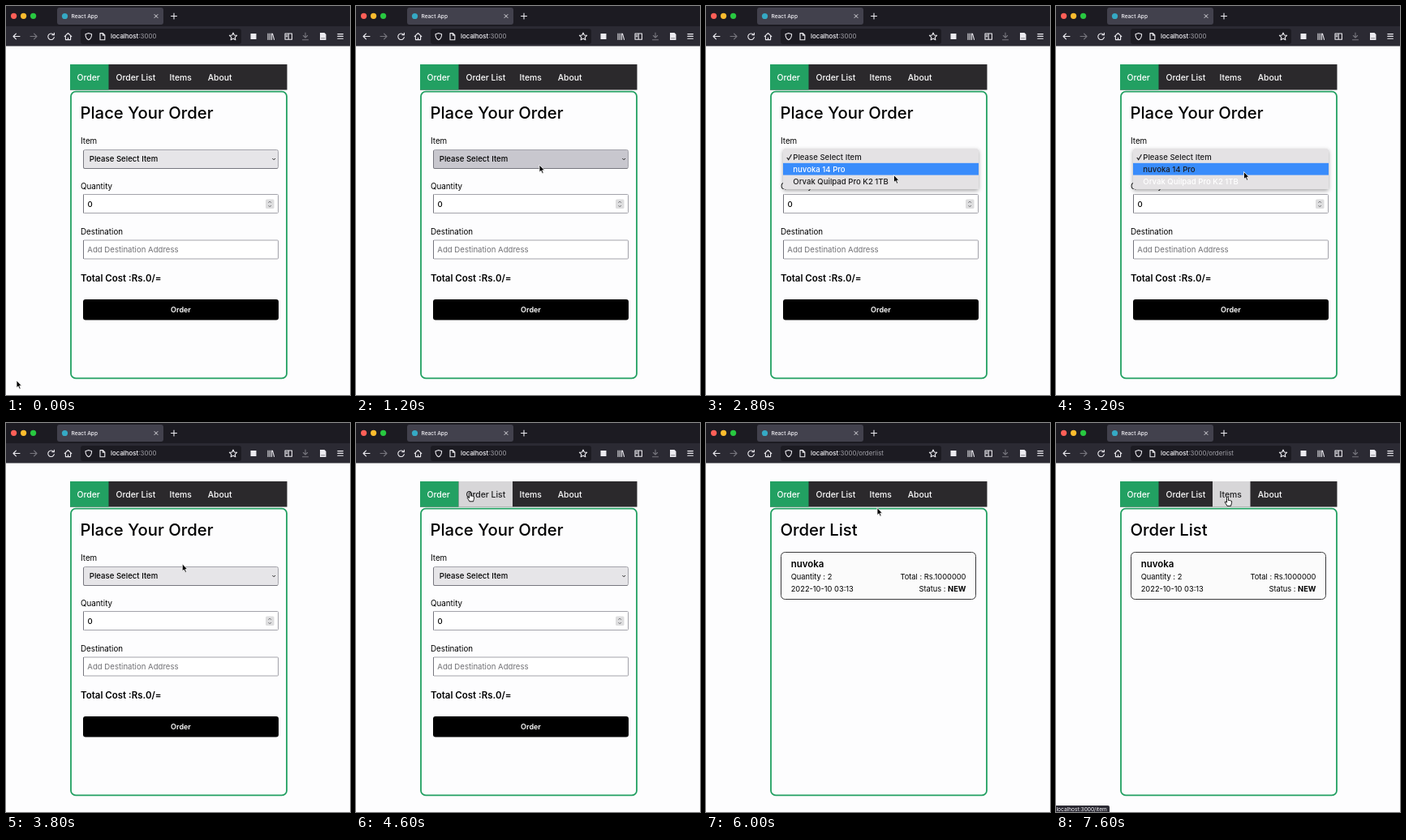
Recreate the animation shown at these times as an HTML page. Size 424 by 480 pixels, loop 8000 ms.

```html
<!DOCTYPE html>
<html lang="en">
<head>
<meta charset="utf-8">
<title>Order form</title>
<style>
html, body { margin: 0; width: 100%; height: 100%; overflow: hidden; background: #fdfdfe; }
svg { display: block; width: 424px; height: 480px; font-family: Inter, "Open Sans", sans-serif; font-size: 9.8px; }
text { white-space: pre; }
.icon { fill: none; stroke: #ecebf0; stroke-width: 1.1; stroke-linecap: round; stroke-linejoin: round; }
.dim { stroke: #77767e; }
.nav { font-size: 10.4px; font-weight: 500; }
.title { font-size: 20.3px; font-weight: 500; }
.strong { font-size: 11.5px; font-weight: 600; }
.field { fill: #fff; stroke: #a3a3aa; }
.edge { fill: none; stroke: #77777f; }
.option { font-size: 9.6px; font-weight: 500; }
.card { font-size: 9.3px; }
</style>
</head>
<body>
<svg viewBox="0 0 424 480">
  <defs>
    <filter id="shadow" x="-10%" y="-20%" width="120%" height="150%">
      <feDropShadow dx="0" dy="2" stdDeviation="2.5" flood-opacity=".35"/>
    </filter>
  </defs>
  <rect width="424" height="480" fill="#fdfdfe"/>

  <!-- Browser chrome -->
  <rect width="424" height="26" fill="#1c1b22"/>
  <rect y="25" width="424" height="24.5" fill="#2b2a33"/>
  <circle cx="9.6" cy="12.3" r="3.6" fill="#fe5f57"/>
  <circle cx="21.6" cy="12.3" r="3.6" fill="#febc2e"/>
  <circle cx="33.6" cy="12.3" r="3.6" fill="#28c840"/>
  <rect x="63" y="2" width="131" height="21" rx="3" fill="#42414d"/>
  <circle cx="72.5" cy="12.5" r="3.6" fill="#35a9c4"/>
  <text x="80.5" y="15" font-size="6.6" font-weight="500" fill="#f4f3f8">React App</text>
  <rect x="92" y="28" width="198" height="19" rx="3" fill="#1c1b22"/>
  <g class="icon">
    <path d="M183 10.5l4 4m0-4l-4 4" stroke-width=".9"/>
    <path d="M203.5 12.5h7m-3.5-3.5v7"/>
    <path d="M17 37.5H9m3.4-3.4L9 37.5l3.4 3.4"/>
    <path class="dim" d="M30 37.5h8m-3.4-3.4l3.4 3.4-3.4 3.4"/>
    <path d="M58.6 35.4a3.8 3.8 0 1 0 .7 3.2M59.4 33.2v2.6h-2.6"/>
    <path d="M72.2 37.6l4.3-4.1 4.3 4.1M73.4 37v4.6h6.2V37M76.5 41.4v-2"/>
    <path d="M101.8 33.4l3.8 1.3c0 3.7-1 5.8-3.8 7.1-2.8-1.3-3.8-3.4-3.8-7.1z"/>
    <path d="M116 33.6h3.4l2.4 2.4v5.7H116zM119.3 33.7v2.5h2.4"/>
    <path d="M280 33l1.4 3 3.2.4-2.4 2.2.7 3.2-2.9-1.6-2.9 1.6.7-3.2-2.4-2.2 3.2-.4z"/>
    <path d="M323 34v7.5m2.3-7.5v7.5m2.2-7.5v7.5m1-7.3l2 7.2"/>
    <path d="M344 34h8.4v7.2H344zm4.2 0v7.2m-2.9-5.2h1.5m-1.5 1.8h1.5"/>
    <path class="dim" d="M369 33v6m-2.6-2.5l2.6 2.6 2.6-2.6M365.5 41.8h7"/>
    <path d="M408.8 34.6h6.6m-6.6 2.8h6.6m-6.6 2.8h6.6"/>
  </g>
  <rect x="301.5" y="34" width="7" height="7" fill="#ecebf0"/>
  <path d="M387 33h5.5l2 2v7H387z" fill="#ecebf0"/>
  <path d="M388.2 39.8h5" stroke="#88878d"/>
  <text x="129" y="40.3" font-size="7.9" font-weight="500" fill="#f6f5fa">localhost<tspan id="path" font-weight="400" fill="#a3a2aa"></tspan></text>

  <!-- Navigation -->
  <rect x="79" y="72" width="267.5" height="31.5" fill="#2b292c"/>
  <rect x="79" y="72" width="47.5" height="31.5" fill="#22a062"/>
  <rect id="hover" y="72" height="31.5" fill="#d7d6d8"/>
  <g class="nav" fill="#fff">
    <text x="87.5" y="91.5">Order</text>
    <text id="listLink" x="135.5" y="91.5">Order List</text>
    <text id="itemsLink" x="201.5" y="91.5">Items</text>
    <text x="248.7" y="91.5">About</text>
  </g>
  <rect x="80" y="105.6" width="266" height="353.8" rx="6" fill="#fdfdfe" stroke="#22a062" stroke-width="1.8"/>

  <g id="formPage">
    <text class="title" x="91.5" y="139.3">Place Your Order</text>
    <text x="92" y="169.8">Item</text>
    <text x="92" y="225.5">Quantity</text>
    <text x="92" y="281.6">Destination</text>
    <rect id="select" class="field" x="95.5" y="177.5" width="240" height="23" rx="2"/>
    <path class="edge" d="M95.5 178.5v21q0 1 1 1h238"/>
    <text class="option" x="102.8" y="192.3">Please Select Item</text>
    <path d="M328.4 188l1.8 1.8 1.8-1.8" fill="none" stroke="#222"/>
    <rect class="field" x="95.5" y="232.5" width="240" height="23" rx="1"/>
    <path class="edge" d="M95.5 255.5v-23"/>
    <text class="option" x="100.5" y="248.3">0</text>
    <rect x="320" y="238.5" width="10.5" height="11.5" rx="1.5" fill="#dededf"/>
    <path d="M323.4 242.8l1.8-1.8 1.8 1.8m-3.6 3.2l1.8 1.8 1.8-1.8" fill="none" stroke="#66666b" stroke-width=".9"/>
    <rect class="field" x="95.5" y="289" width="240" height="23" rx="1"/>
    <path class="edge" d="M95.5 312v-23"/>
    <text x="100.3" y="304.3" font-size="9.6" fill="#707074">Add Destination Address</text>
    <text class="strong" x="92" y="339.6">Total Cost :Rs.0/=</text>
    <rect x="95" y="362" width="241" height="25.5" rx="3"/>
    <text x="215.5" y="377.6" font-size="9" font-weight="600" fill="#fff" text-anchor="middle">Order</text>
    <g id="menu">
      <rect x="95" y="176" width="241" height="50" rx="2.5" fill="#e4e2e4" filter="url(#shadow)"/>
      <rect id="highlight" x="95" width="241" height="14.8" fill="#398cfb"/>
      <path id="check" d="M99.8 187l1.9 2.7 3.7-6.4" fill="none" stroke-width="1.2"/>
      <g class="option" id="options">
        <text x="107.3" y="190">Please Select Item</text>
        <text x="107.3" y="204.8">nuvoka 14 Pro</text>
        <text x="107.3" y="219.6">Orvak Quilpad Pro K2 1TB</text>
      </g>
    </g>
  </g>

  <g id="listPage">
    <text class="title" x="91.5" y="139.3">Order List</text>
    <rect x="92.5" y="159.5" width="240" height="58" rx="5" fill="#fbfbfb" stroke="#3a3a3c"/>
    <text class="strong" x="104.7" y="178">nuvoka</text>
    <g class="card">
      <text x="104.7" y="193.2">Quantity : 2</text>
      <text x="104.7" y="207.6">2022-10-10 03:13</text>
      <g text-anchor="end">
        <text x="320.5" y="193.2">Total : Rs.1000000</text>
        <text x="320.5" y="207.6">Status : <tspan font-weight="700">NEW</tspan></text>
      </g>
    </g>
  </g>

  <g id="status">
    <path d="M0 472h64q2 0 2 2v6H0z" fill="#2b2a33"/>
    <text x="0.5" y="479" font-size="6.6" fill="#f6f5fa">localhost:3000/item</text>
  </g>

  <g id="pointer" stroke-linejoin="round">
    <path id="arrow" d="M0 0v9.2l2.1-1.9 1.5 3.4 1.6-.7-1.5-3.3h2.7z" fill="#000" stroke="#fff" stroke-width=".8"/>
    <path id="hand" d="M-1 1q0-1.3 1-1.3T1 1v3.2q.5-.7 1.4 0 .8-.5 1.4.3 1.3-.2 1.3 1.1c0 2.8-.8 3.1-1 5.2H-.6C-1 9.2-2.6 8-3.2 6.6q-.4-1.2.8-1.1L-1 6.6z" fill="#fff" stroke="#000" stroke-width=".9"/>
  </g>
</svg>
<script>
const LOOP = 8000, STEP = 200;
const MENU_OPEN = 1600, MENU_CLOSE = 3600, PAGE_CHANGE = 5000, STATUS_SHOW = 6800;
const el = id => document.getElementById(id);

// Pointer tip: time, x, y
const path = [
  [0, 13, 462], [1000, 226, 196], [1200, 226, 196], [1600, 231.5, 191], [2200, 231.5, 191],
  [2600, 231.5, 202], [3000, 231.5, 215], [3200, 231.5, 204.5], [3400, 231.5, 190],
  [3600, 231.5, 190], [4400, 140.5, 86], [5200, 140.5, 86], [5800, 211, 104.5],
  [6000, 211, 104.5], [6400, 211.5, 91.5], [LOOP, 211.5, 91.5]
];
const links = [
  { id: "listLink", left: 126.5, right: 193 },
  { id: "itemsLink", left: 193, right: 239.5 }
];

function pointerAt(time) {
  const next = path.findIndex(point => point[0] > time);
  const [t0, x0, y0] = path[next - 1], [t1, x1, y1] = path[next];
  const u = (time - t0) / (t1 - t0), eased = u * u * (3 - 2 * u);
  return { x: x0 + (x1 - x0) * eased, y: y0 + (y1 - y0) * eased };
}

const rowAt = time => Math.max(0, Math.min(2, Math.floor((pointerAt(time).y - 179) / 14.8)));
const show = (id, visible) => el(id).setAttribute("visibility", visible ? "inherit" : "hidden");

function draw(time) {
  const { x, y } = pointerAt(time);
  const menuOpen = time >= MENU_OPEN && time < MENU_CLOSE;
  const onList = time >= PAGE_CHANGE;

  show("formPage", !onList);
  show("listPage", onList);
  show("menu", !onList && menuOpen);
  show("status", time >= STATUS_SHOW);
  el("path").textContent = onList ? ":3000/orderlist" : ":3000";

  const overSelect = !menuOpen && x > 95 && x < 336 && y > 177 && y < 201;
  el("select").style.fill = overSelect ? "#c8c7ce" : "#e6e5e8";

  // Option text changes colour one step after the highlight moves
  el("highlight").setAttribute("y", 179 + rowAt(time) * 14.8);
  const textRow = rowAt(Math.max(0, time - STEP));
  [...el("options").children].forEach((option, i) =>
    option.setAttribute("fill", i === textRow ? "#fff" : "#1d1d1f"));
  el("check").setAttribute("stroke", textRow === 0 ? "#fff" : "#1d1d1f");

  const link = links.find(l => y > 72 && y < 103.5 && x > l.left && x < l.right);
  links.forEach(l => el(l.id).setAttribute("fill", l === link ? "#1d1d1f" : "#fff"));
  show("hover", link);
  if (link) {
    el("hover").setAttribute("x", link.left);
    el("hover").setAttribute("width", link.right - link.left);
  }

  show("hand", link);
  show("arrow", !link);
  el("pointer").setAttribute("transform", `translate(${x} ${y})`);
}

function tick() {
  draw(Math.floor(performance.now() % LOOP / STEP) * STEP);
  requestAnimationFrame(tick);
}
tick();
</script>
</body>
</html>
```
